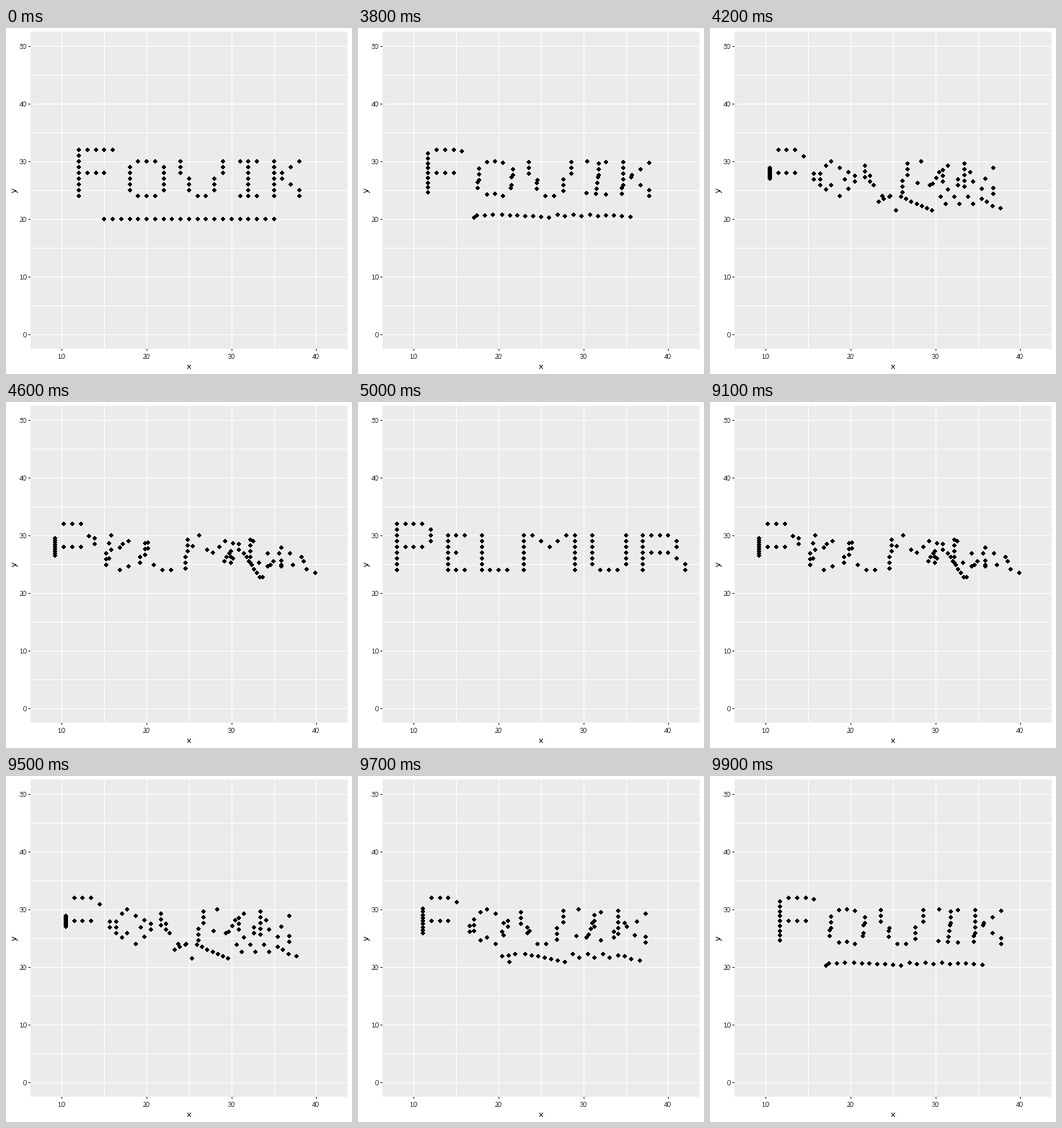
Recreate the animation shown at these times as a matplotlib script. Size 480x480 px, loop 10 s.

```python
import matplotlib.pyplot as plt
import numpy as np
from matplotlib.animation import FuncAnimation
from matplotlib.collections import PolyCollection
from matplotlib.patches import Rectangle

SIZE = 480
LEFT, RIGHT, TOP, BOTTOM = 34, 474, 5, 445

# Crisp, grid-fitted small type
plt.rcParams.update({"font.family": "Liberation Sans",
                     "text.hinting": "native",
                     "text.hinting_factor": 1,
                     "text.antialiased": False})


def px(x):
    return 33.95 + (x - 6.3) / 37.4 * (RIGHT - LEFT)


def py(y):
    return 5.14 + (52.5 - y) / 55 * (BOTTOM - TOP)


def line(x0, y0, x1, y1):
    """Grid points from one end to the other, both included."""
    n = max(abs(x1 - x0), abs(y1 - y0)) + 1
    return list(zip(np.linspace(x0, x1, n), np.linspace(y0, y1, n)))


def stem(x, lo=24, hi=30):
    return line(x, lo, x, hi)


def bar(x0, x1, *rows):
    return [p for y in rows for p in line(x0, y, x1, y)]


def ordered(points, falls):
    """Left to right; columns run upwards unless falls(x) holds."""
    return sorted(points, key=lambda p: (p[0], -p[1] if falls(p[0]) else p[1]))


def first_word():
    f = stem(12, 24, 32) + bar(13, 16, 32) + bar(13, 15, 28)
    o = stem(18, 25, 29) + bar(19, 21, 24, 30) + stem(22, 25, 29)
    v = (stem(24, 28, 30) + stem(25, 25, 27) + bar(26, 27, 24)
         + stem(28, 25, 27) + stem(29, 28, 30))
    i = stem(32) + bar(31, 31, 24, 30) + bar(33, 33, 24, 30)
    k = (stem(35) + line(36, 28, 38, 30) + line(36, 27, 38, 25)
         + [(38, 24)])
    underline = line(16, 20, 35, 20) + [(15, 20)]
    return ordered(f + o + v + i + k, lambda x: x == 12) + underline


def second_word():
    p = stem(8, 24, 32) + bar(9, 11, 28, 32) + stem(12, 29, 31)
    e = stem(14) + bar(15, 16, 24, 30) + [(15, 27)]
    l = stem(18) + bar(19, 21, 24)
    m = stem(23) + line(24, 30, 26, 28) + line(27, 29, 28, 30) + stem(29)
    u = stem(31, 25, 30) + bar(32, 34, 24) + stem(35, 25, 30)
    r = (stem(37) + bar(38, 40, 27, 30) + stem(41, 28, 29)
         + line(41, 26, 42, 25) + [(42, 24)])
    return ordered(p + e + l + m + u + r, lambda x: x >= 37)


def dot_outline():
    """Stepped outline of a round dot six pixels across."""
    quarter = [(1, 3), (1, 2), (2, 2), (2, 1), (3, 1)]
    right = quarter + [(x, -y) for x, y in quarter[::-1]]
    return np.array(right + [(-x, y) for x, y in right[::-1]], float)


fig = plt.figure(figsize=(4.8, 4.8), dpi=100, facecolor="white")
ax = fig.add_axes([0, 0, 1, 1])
ax.set(xlim=(0, SIZE), ylim=(SIZE, 0))
ax.axis("off")


def box(x, y, w, h, color):
    ax.add_patch(Rectangle((x, y), w, h, fc=color, ec="none", lw=0,
                           antialiased=False))


def label(x, y, text, size, color, **kw):
    ax.text(x, y, text, fontsize=size * 0.72, color=color,
            va="baseline", **kw)


box(LEFT, TOP, RIGHT - LEFT, BOTTOM - TOP, "#ebebeb")
for x in range(10, 41, 5):
    box(round(px(x)), TOP, 1, BOTTOM - TOP, "white")
for y in range(0, 51, 5):
    box(LEFT, round(py(y)), RIGHT - LEFT, 1, "white")
for x in range(10, 41, 10):
    box(round(px(x)), BOTTOM, 1, 3, "#333333")
    label(round(px(x)), 459, str(x), 9, "#4d4d4d", ha="center")
for y in range(0, 51, 10):
    box(LEFT - 3, round(py(y)), 3, 1, "#333333")
    label(29, round(py(y)) + 4, str(y), 9, "#4d4d4d", ha="right")
label(254, 473, "x", 11, "black", ha="center")
label(15, 225, "y", 11, "black", ha="center", rotation=90,
      rotation_mode="anchor")

start, end = np.array(first_word()), np.array(second_word())
outline = dot_outline()
dots = PolyCollection([], facecolors="black", edgecolors="none",
                      linewidths=0, antialiaseds=False, zorder=3)
ax.add_collection(dots, autolim=False)


def draw(frame):
    mix = np.interp(frame, [37, 50, 87, 100], [0, 1, 1, 0])
    x, y = (start + (end - start) * mix).T
    centers = np.round(np.column_stack([px(x), py(y)]))
    dots.set_verts(centers[:, None] + outline)
    return [dots]


anim = FuncAnimation(fig, draw, frames=100, interval=100, repeat=True,
                     repeat_delay=0, blit=False)
plt.show()
```
